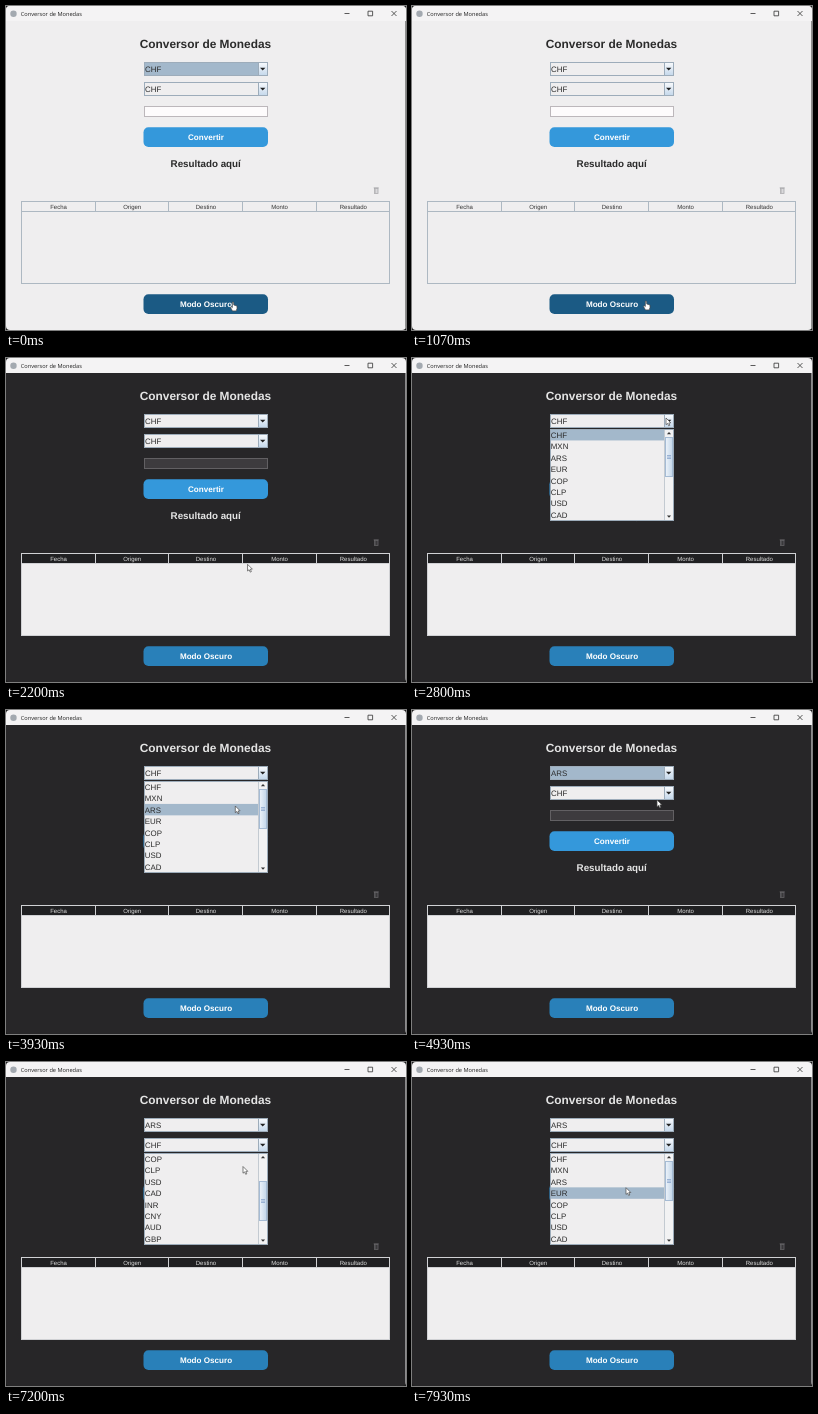
These frames come from a looping animation (400 by 324 pixels, 8000 ms). An HTML page with a canvas:

```html
<!DOCTYPE html>
<html lang="es">
<head>
<meta charset="utf-8">
<title>Conversor de Monedas</title>
<style>
html, body { margin: 0; width: 100%; height: 100%; overflow: hidden; background: #1c1c1c; }
canvas { display: block; }
</style>
</head>
<body>
<canvas id="stage" width="400" height="324"></canvas>
<script>
const ctx = document.getElementById('stage').getContext('2d');
ctx.textRendering = 'geometricPrecision';
const LOOP = 8000, TICK = 1000 / 15;
const SANS = '"Liberation Sans", Arial, sans-serif';
const ITEMS = 'CHF MXN ARS EUR COP CLP USD CAD INR CNY AUD GBP JPY BRL PEN'.split(' ');
const HEADERS = ['Fecha', 'Origen', 'Destino', 'Monto', 'Resultado'];
const ROWS = 8, ROW_H = 11.45;
const LINE = '#9dacba', SELECTED = '#a3b8cb', PALE = '#efeeef';

const LIGHT = { bg: PALE, text: '#2b2b2b', field: '#fdfbfc', fieldLine: '#bcb7bb', edge: '#8f8f8f',
  head: PALE, headText: '#333', headLine: '#adb8c2', icon: '#a9a9ac' };
const DARK = { bg: '#272628', text: '#e4e4e4', field: '#3d3b3e', fieldLine: '#626063', edge: '#8a898b',
  head: '#202022', headText: '#dedede', headLine: '#d0d1d4', icon: '#656366' };

// Pointer stops: time, x, y
const PATH = [[0, 227, 296], [400, 227, 296], [670, 234, 295], [1870, 234, 295],
  [2670, 254, 60], [3200, 254, 60], [3930, 229.3, 96], [4600, 229.3, 96], [4930, 245, 90],
  [5200, 254, 81], [5600, 254, 81], [5930, 237, 104.5], [7730, 237, 104.5],
  [7930, 214, 125.7], [LOOP, 214, 125.7]];
// List scrolling: time, first visible item
const SCROLL = [[0, 0], [5930, 3], [6120, 6], [6320, 7], [7190, 4], [7260, 1], [7390, 0]];

function pointerAt(t) {
  const i = Math.max(1, PATH.findIndex(p => p[0] >= t));
  const [t0, x0, y0] = PATH[i - 1], [t1, x1, y1] = PATH[i];
  const u = (t - t0) / (t1 - t0), e = u * u * (3 - 2 * u);
  return { x: x0 + (x1 - x0) * e, y: y0 + (y1 - y0) * e };
}

function rect(x, y, w, h, fill, line) {
  if (fill) { ctx.fillStyle = fill; ctx.fillRect(x, y, w, h); }
  if (line) { ctx.strokeStyle = line; ctx.lineWidth = 1; ctx.strokeRect(x + .5, y + .5, w - 1, h - 1); }
}

function text(str, x, y, size, color, { bold = false, align = 'center', family = SANS } = {}) {
  ctx.font = `${bold ? 'bold ' : ''}${size}px ${family}`;
  ctx.textAlign = align;
  ctx.fillStyle = color;
  ctx.fillText(str, x, y);
}

function shape(points, fill, line) {
  ctx.beginPath();
  points.forEach(([x, y]) => ctx.lineTo(x, y));
  ctx.closePath();
  ctx.fillStyle = fill;
  ctx.fill();
  if (line) { ctx.strokeStyle = line; ctx.lineWidth = .7; ctx.stroke(); }
}

function gradient(x0, y0, x1, y1, from, to) {
  const g = ctx.createLinearGradient(x0, y0, x1, y1);
  g.addColorStop(0, from);
  g.addColorStop(1, to);
  return g;
}

function titleBar() {
  rect(0, 0, 400, 15, '#f4f3f4');
  ctx.fillStyle = '#a3a9b0';
  ctx.beginPath(); ctx.arc(7.5, 7.7, 3.2, 0, 7); ctx.fill();
  text('Conversor de Monedas', 14.8, 9.8, 5.65, '#222',
    { align: 'left', family: '"Open Sans", "Noto Sans", sans-serif' });
  ctx.strokeStyle = '#333';
  ctx.lineWidth = .8;
  ctx.beginPath();
  ctx.moveTo(338.5, 7.5); ctx.lineTo(343.5, 7.5);
  ctx.rect(362, 5.2, 4.6, 4.6);
  ctx.moveTo(385.5, 5); ctx.lineTo(390.5, 10);
  ctx.moveTo(390.5, 5); ctx.lineTo(385.5, 10);
  ctx.stroke();
}

function button(label, y, fill) {
  ctx.beginPath();
  ctx.roundRect(137.5, y + .3, 124.5, 19.7, 5);
  ctx.fillStyle = fill;
  ctx.fill();
  text(label, 200, y + 13.1, 8.1, '#fff', { bold: true });
}

function combo(value, y, focused) {
  rect(138, y, 124, 14, focused ? SELECTED : PALE, LINE);
  rect(252, y, 10, 14, gradient(0, y, 0, y + 14, '#fbfcfe', '#c2d6ea'), LINE);
  shape([[254, y + 5.7], [259.4, y + 5.7], [256.7, y + 8.6]], '#222');
  text(value, 139.1, y + 9.9, 7.9, '#2b2b2b', { align: 'left' });
}

function popup(y, selected, first) {
  const h = ROWS * ROW_H, track = h - 16;
  rect(138, y, 124, h, PALE);
  for (let i = 0; i < ROWS; i++) {
    const top = y + i * ROW_H;
    if (first + i === selected) rect(138, top, 114.5, ROW_H, SELECTED);
    text(ITEMS[first + i], 138.8, top + 8.7, 7.9, '#2b2b2b', { align: 'left' });
  }
  rect(252.5, y, 9, h, '#f2f2f3');
  rect(252, y, 1, h, '#c3cad1');
  shape([[254.9, y + 5.2], [259.1, y + 5.2], [257, y + 2.9]], '#333');
  shape([[254.9, y + h - 5.2], [259.1, y + h - 5.2], [257, y + h - 2.9]], '#333');
  const thumbY = Math.round(y + 7.5 + track * first / ITEMS.length);
  const thumbH = Math.round(track * ROWS / ITEMS.length);
  rect(253, thumbY, 8, thumbH, gradient(253, 0, 261, 0, '#f0f5fb', '#c0d4e8'), '#a5bbd4');
  for (let i = -1; i < 2; i++) rect(255, thumbY + thumbH / 2 + i * 1.6 - .3, 4, .7, '#7f9cc8');
  rect(138, y, 124, Math.round(h), null, LINE);
}

function table(theme) {
  rect(15, 195, 369, 83, PALE, theme.headLine);
  rect(16, 196, 367, 9, theme.head);
  rect(15, 205, 369, 1, theme.headLine);
  HEADERS.forEach((name, i) => {
    if (i) rect(Math.round(15 + i * 73.7), 195, 1, 11, theme.headLine);
    text(name, 52.5 + i * 73.7, 202.9, 6, theme.headText);
  });
}

function trashIcon(color) {
  ctx.strokeStyle = color;
  ctx.lineWidth = .8;
  ctx.strokeRect(368.4, 182.4, 3.6, 5.2);
  rect(367.7, 181.4, 5, .9, color);
  rect(369.4, 183, .6, 4, color);
  rect(370.7, 183, .6, 4, color);
}

function pointer({ x, y }, hand) {
  ctx.save();
  ctx.translate(x, y);
  ctx.lineJoin = 'round';
  const points = hand
    ? [[-.6, 0], [.6, 0], [.8, 3], [4, 4], [4, 6.5], [3.2, 8.9], [-.5, 8.9], [-2.6, 5.3], [-1.8, 4.7], [-.7, 5.6]]
    : [[0, 0], [0, 6.7], [1.6, 5.4], [2.7, 7.8], [3.8, 7.3], [2.8, 4.9], [4.8, 4.8]];
  shape(points, '#fff', '#4a4a4a');
  ctx.restore();
}

function draw(time) {
  const t = Math.floor(time / TICK + .06) * TICK + 4;
  const theme = t < 1268 ? LIGHT : DARK;
  const p = pointerAt(Math.min(t, LOOP));
  const firstOpen = t >= 2798 && t < 4398, secondOpen = t >= 5328;
  const over = y => !firstOpen && !secondOpen && p.y >= y && p.y <= y + 20;
  const overConvert = over(121), overMode = over(288);

  rect(0, 0, 400, 324, '#1c1c1c');
  ctx.save();
  ctx.beginPath();
  ctx.roundRect(0, 0, 400, 324, 4);
  ctx.clip();
  rect(0, 0, 400, 324, theme.bg);
  rect(399, 15, 1, 309, theme.edge);
  titleBar();
  text('Conversor de Monedas', 199.4, 42.1, 11.9, theme.text, { bold: true });
  combo(t < 4398 ? 'CHF' : 'ARS', 56, t < 1068 || (t >= 4398 && !secondOpen));
  combo('CHF', 76, false);
  rect(138, 100, 124, 11, theme.field, theme.fieldLine);
  button('Convertir', 121, overConvert ? '#2980b9' : '#3498db');
  text('Resultado aquí', 199.7, 160.5, 9.8, theme.text, { bold: true });
  trashIcon(theme.icon);
  table(theme);
  button('Modo Oscuro', 288, overMode ? '#1b5a84' : '#2980b9');

  if (firstOpen || secondOpen) {
    const y = firstOpen ? 71 : 91;
    const first = SCROLL.filter(s => s[0] <= t).pop()[1];
    popup(y, Math.max(0, Math.floor((p.y - y) / ROW_H)), first);
  }
  pointer(p, overConvert || overMode);
  ctx.restore();
}

function frame() {
  draw(performance.now() % LOOP);
  requestAnimationFrame(frame);
}
frame();
</script>
</body>
</html>
```
